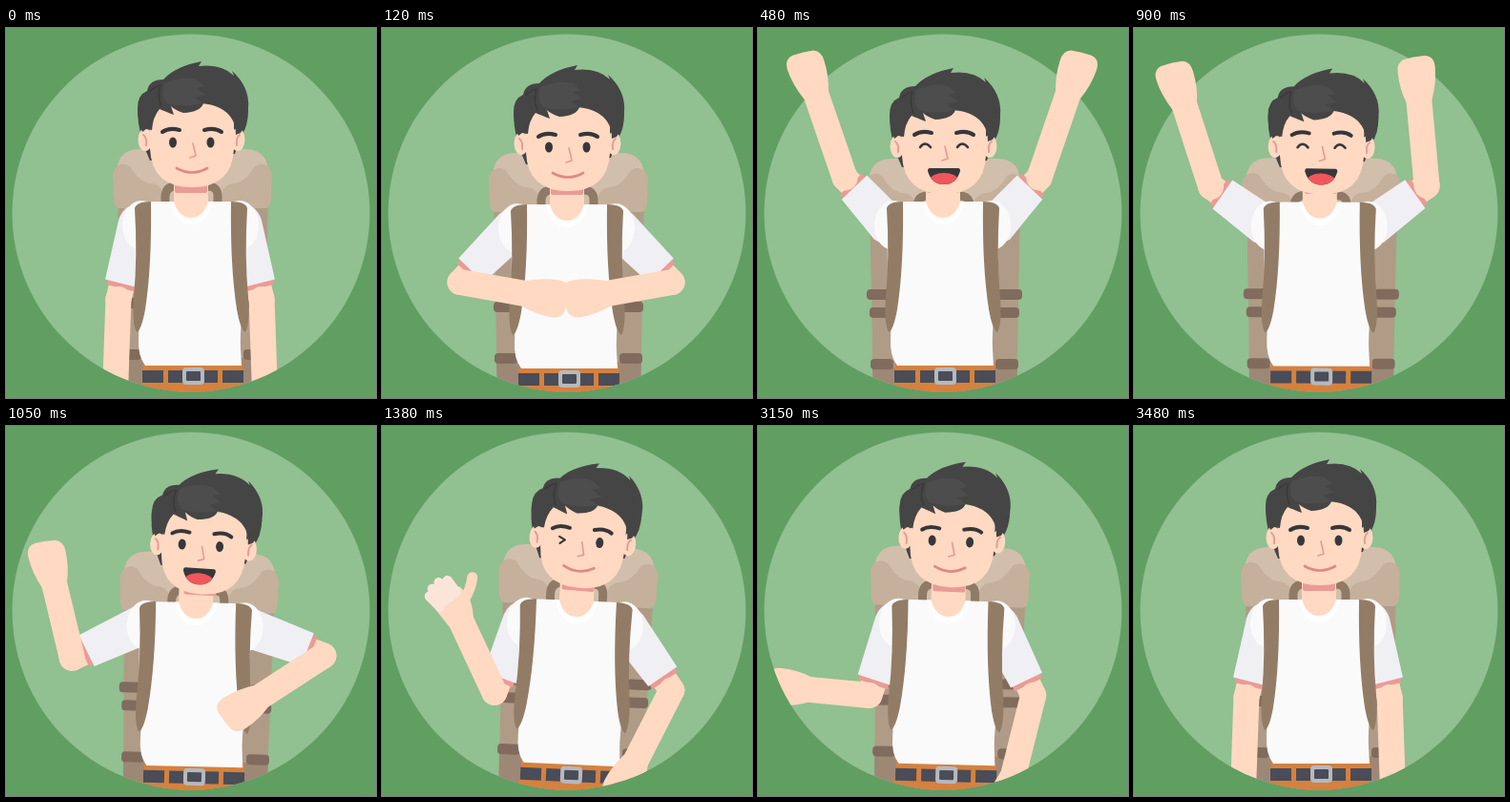
Write an HTML page with a canvas that moves like this. It is 388x388 px and loops after 3.57 s.

```html
<!DOCTYPE html>
<html lang="en">
<head>
<meta charset="utf-8">
<title>Cheerful backpacker</title>
<style>
html, body { margin: 0; width: 100%; height: 100%; overflow: hidden; background: #619e62; }
canvas { display: block; }
</style>
</head>
<body>
<canvas width="388" height="388"></canvas>
<script>
const c = document.querySelector('canvas').getContext('2d');
const LOOP = 3570, STEP = 30, RAD = Math.PI / 180;
const SKIN = '#ffd9c2', PINK = '#e99b95', HAIR = '#454545', INK = '#37373b',
  SHIRT = '#fafafa', SLEEVE = '#f0eff3', STRAP = '#937c66', BAND = '#806b5d';

// torso, pack: x, y, turn; head: x, y, turn, face x, face y, neck shade
// arms: upper angle, upper length, forearm angle, forearm length
const pose = (torso, pack, head, left, right = left) =>
  [...torso, ...pack, ...head, ...left, ...right];

const rest = pose([0, 0, 0], [0, -2, 0], [0, 0, 0, 0, 0, 7], [-166, 81, 182, 114]);
const crouch = pose([0, 3, 0], [0, 2, 0], [0, 4, 0, 0, 1, 5], [-136, 80, 100, 92]);
const raise = pose([0, -6, 0], [0, 0, 0], [0, 0, 0, 0, -5, 0], [-59.5, 77, -8, 103]);
const stretch = pose([0, -7, 0], [0, 0, 0], [0, 0, 0, 0, -5, 0], [-49, 75, -14, 118]);
const cheer = pose([0, 0, 0], [0, 8, 0], [0, 7, 0, 0, -4, 0], [-43.5, 67.5, -19, 116]);
const turn = pose([1, 3, 1.3], [3, 4, 1.3], [13, 9.5, 3.7, -3, -4, 2],
  [-116, 81, -13.5, 103], [-111, 85.5, 123, 102]);
const wave = pose([2, 1, 2.5], [3, -3, 2.3], [16.5, 3, 5, -2, -2, 4],
  [-159, 80, -25, 105], [-145.5, 82, 153, 106]);
const drop = pose([1, 1, 1.2], [2, -2, 1], [8, 2, 2.4, -1, -1, 6],
  [-162, 81, -95, 86], [-156, 82, 168, 110]);
const settled = rest.slice();
settled[14] -= 360;

const keys = [[0, rest], [120, crouch], [240, raise], [330, stretch], [480, cheer],
  [840, cheer], [1050, turn], [1380, wave], [2970, wave], [3180, drop],
  [3480, settled], [LOOP, settled]];

// Slope at key i; flat at holds and turning points
function slope(i, n) {
  if (!i || i === keys.length - 1) return 0;
  const [[t0, a], [, b], [t2, d]] = keys.slice(i - 1, i + 2);
  return (b[n] - a[n]) * (d[n] - b[n]) <= 0 ? 0 : (d[n] - a[n]) / (t2 - t0);
}

function poseAt(t) {
  const i = keys.findIndex(k => k[0] > t) - 1;
  const [t0, a] = keys[i], [t1, b] = keys[i + 1];
  const d = t1 - t0, u = (t - t0) / d, v = 1 - u;
  return a.map((from, n) =>
    v * v * (1 + 2 * u) * from + u * u * (3 - 2 * u) * b[n] +
    d * u * v * (v * slope(i, n) - u * slope(i + 1, n)));
}

function fill(color, path) {
  c.fillStyle = color;
  c.fill(new Path2D(path));
}

function line(color, width, path) {
  c.strokeStyle = color;
  c.lineWidth = width;
  c.lineCap = c.lineJoin = 'round';
  c.stroke(new Path2D(path));
}

function oval(color, x, y, rx, ry) {
  c.fillStyle = color;
  c.beginPath();
  c.ellipse(x, y, rx, ry, 0, 0, 7);
  c.fill();
}

function box(color, x, y, w, h, r = 0) {
  c.fillStyle = color;
  c.beginPath();
  c.roundRect(x, y, w, h, r);
  c.fill();
}

function group(draw) {
  c.save();
  draw();
  c.restore();
}

function turned([x, y, a], px, py, draw) {
  group(() => {
    c.translate(px + x, py + y);
    c.rotate(a * RAD);
    c.translate(-px, -py);
    draw();
  });
}

// Draws twice, the second time flipped within the given width
const mirrored = (width, draw) => [1, -1].forEach(s => group(() => {
  if (s < 0) { c.translate(width, 0); c.scale(-1, 1); }
  draw();
}));

function drawPack() {
  fill('#b09b87', 'M117 170H275L271 385H121Z');
  fill('#9d8876', 'M120 348H272L271 385H121Z');
  fill('#d2bfab', 'M116 160Q114 129 140 129H251Q277 129 275 160L262 190H126Z');
  mirrored(391, () => {
    fill('#c5b09b', 'M118 191Q113 189 113 180L112 155Q117 140 130 147Q140 164 152 165Q166 166 166 185V191Z');
    box(BAND, 114, 266, 26, 11, 4);
    box(BAND, 117, 285, 24, 11, 4);
    box(BAND, 118, 339, 24, 11, 4);
  });
  line('#8f7a66', 9, 'M167 188V178Q168 168 178 168H211Q222 168 222 178V188');
}

function drawTorso() {
  fill('#d5813f', 'M144 350H248L251 395H140Z');
  for (const [x, w] of [[143, 22], [170, 52], [227, 22]]) box('#4a4c57', x, 359, w, 13);
  box('#b6b9bd', 185, 356, 23, 18, 4);
  box('#4a4c57', 189, 360, 15, 10, 1);
  mirrored(387, () => oval(SHIRT, 142, 207, 20, 26));
  fill(SHIRT, 'M138 186Q146 182 156 182H233Q243 182 250 186Q253 230 250 270Q245 320 246 336L247 354H146Q138 344 139 325Q140 310 137 270Q134 230 138 186Z');
  fill('#fff', 'M172 182Q178 206 194 206Q210 206 217 182Z');
  fill(SKIN, 'M176 155H212V182Q207 199 194 199Q181 199 176 182Z');
  mirrored(388, () => fill(STRAP, 'M135 189Q137 182 152 182Q153 250 146 295Q142 317 137 319Q132 310 134 282Q138 240 135 189Z'));
}

function upperArm(len) {
  const end = -0.79 * len;
  line(SKIN, 27, `M0 -20V${-len}`);
  box(PINK, -16, end - 5, 32, 8);
  fill(SLEEVE, `M-18 ${end}H18.5L20 0Q18 20 0 20Q-18 20 -22 0Z`);
}

function foreArm(len, thumb) {
  line(SKIN, 27, `M0 0V${18 - len}`);
  c.translate(0, -len);
  if (!thumb) {
    fill(SKIN, 'M-13.5 24Q-20 6 -20 -10Q-20 -22 -10 -23Q2 -23 12 -21Q20 -18 19.5 -7Q19 10 13.5 24Z');
    return;
  }
  fill(SKIN, 'M-13.5 24L-19 1Q-10 -12 14 -11L18 2Q18 12 13.5 24Z');
  line(SKIN, 11, 'M12 4Q24 -4 30 -14');
  line('#fbe5d9', 10.5, 'M8 -7L5 -22M0 -5L-4 -24M-7 -4L-13 -21M-14 -1L-19 -15');
}

// Enters the frame of one arm at its shoulder
function atShoulder(p, side, draw) {
  const [x, y, turn] = p, a = turn * RAD;
  const sx = -2 - 55.5 * side, sy = -159;
  const arm = p.slice(side > 0 ? 12 : 16, side > 0 ? 16 : 20);
  group(() => {
    c.translate(195 + x + sx * Math.cos(a) - sy * Math.sin(a),
      365 + y + sx * Math.sin(a) + sy * Math.cos(a));
    c.scale(side, 1);
    c.rotate(arm[0] * RAD);
    draw(arm);
  });
}

function drawFace(open, closed, wink) {
  line(INK, 4, 'M164 109Q171 104 182 107M208 107Q219 104 226 109');
  line(PINK, 1.7, 'M196 121L199 134L193 136');
  if (closed) {
    line(INK, 2.6, 'M170 122Q175 115 181 122M209 122Q214 115 220 122');
  } else {
    if (wink) line(INK, 2.2, 'M172 117L178 120L173 124');
    else oval(INK, 175, 120, 4, 5.5);
    oval(INK, 214.5, 120, 4, 5.5);
  }
  if (!open) {
    line('#de8a83', 2.7, 'M179 147Q195 156 211 147');
    return;
  }
  const mouth = 'M180 144H210Q212 144 212 147Q208 161 195 161Q182 161 178 147Q178 144 180 144Z';
  fill(INK, mouth);
  group(() => {
    c.clip(new Path2D(mouth));
    oval('#f1565d', 195, 157, 15, 8);
  });
}

function drawHead(faceX, faceY, shade, ...mood) {
  box(PINK, 177, 155, 34, 11 + shade, 2);
  fill(HAIR, 'M151 139Q138 112 138 85H254Q254 104 247 112L240 132Z');
  mirrored(389, () => {
    oval(SKIN, 146, 117, 7.5, 12);
    line(PINK, 2, 'M144 112Q148 115 147 123');
  });
  fill(SKIN, 'M150 80H239V127Q237 167 195 167Q153 167 151 127Z');
  fill(HAIR, 'M143 109Q138 98 138 84Q138 70 148 66Q150 54 165 54Q178 40 205 35L202 40Q226 37 239 50L237 45Q256 62 254 84Q253 100 246 110L241 112Q241 101 236 94Q228 82 207 79Q204 88 186 89Q177 86 173 82L176 91Q166 87 161 85Q154 93 153 107L147 106Z');
  fill('#4d4d4d', 'M166 58Q184 50 200 54L208 61L200 63L210 70L198 73L207 79Q186 84 169 79Q161 71 166 58Z');
  line('#393939', 1.5, 'M151 66Q160 59 162 60Q158 71 163 82');
  c.translate(faceX, faceY);
  drawFace(...mood);
}

function frame(now) {
  const t = Math.floor(now % LOOP / STEP) * STEP;
  const during = (from, to) => t >= from && t < to;
  const p = poseAt(t), wink = during(1260, 2970);
  box('#619e62', 0, 0, 388, 388);
  oval('#91c091', 194, 194, 187.5, 187.5);
  group(() => {
    c.beginPath();
    c.rect(0, 0, 388, 194);
    c.arc(194, 194, 187.5, 0, Math.PI);
    c.clip();
    turned(p.slice(3, 6), 195, 345, drawPack);
    for (const side of [1, -1]) atShoulder(p, side, arm => upperArm(arm[1]));
    turned(p, 195, 365, drawTorso);
    turned(p.slice(6, 9), 194, 110, () =>
      drawHead(...p.slice(9, 12), during(330, 1140), during(360, 930), wink));
    for (const side of [1, -1]) atShoulder(p, side, ([a, len, b, reach]) => {
      c.translate(0, -len);
      c.rotate((b - a) * RAD);
      foreArm(reach, wink && side > 0);
    });
  });
}

const start = performance.now();
(function tick() {
  frame(performance.now() - start);
  requestAnimationFrame(tick);
})();
</script>
</body>
</html>
```
